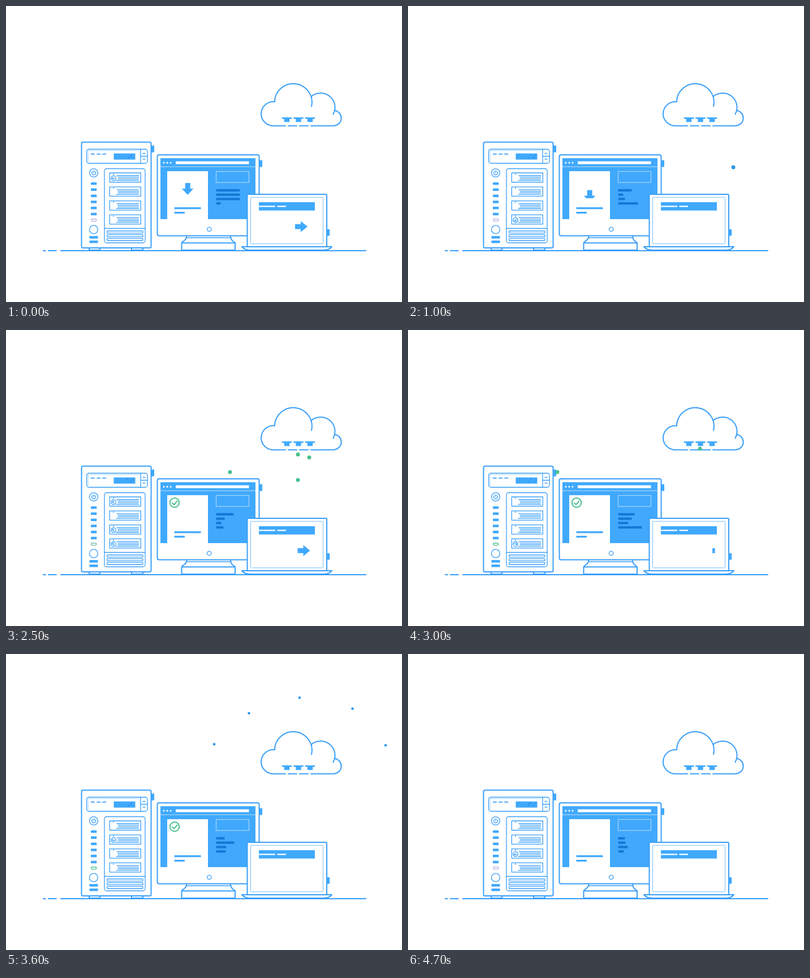
Write an HTML page that moves like this. It is 700 px wide and 525 px high and loops after 4800 ms.

```html
<!DOCTYPE html>
<html lang="en">
<head>
<meta charset="utf-8">
<title>Cloud sync</title>
<style>
html, body { margin: 0; width: 100%; height: 100%; overflow: hidden; background: #fff; }
svg { display: block; width: 700px; height: 525px; }
.line { fill: none; stroke: #389ef9; stroke-width: 2; stroke-linejoin: round; stroke-linecap: round; }
.thin { stroke-width: 1.3; }
.pale { stroke: #a9d5fd; stroke-width: 1.2; }
.body { fill: #fff; }
.fill { fill: #40a9fd; }
.white { fill: #fff; }
.dark { fill: #1279d6; }
</style>
</head>
<body>
<svg viewBox="0 0 700 525">
  <defs>
    <clipPath id="downClip"><rect x="305" y="313" width="32" height="28"/></clipPath>
    <clipPath id="rightClip"><rect x="510" y="378" width="32.6" height="28"/></clipPath>
    <path id="toCloud" d="M570 401H596V286H536V203"/>
    <path id="fromScreen" d="M451 279H516V205"/>
    <path id="toServer" d="M496 205V252H258"/>
  </defs>

  <path class="line" d="M66 434h4M75 434h14M97 434H636"/>

  <g id="cloud">
    <path class="line" d="M470 212.4A21.3 21.3 0 1 1 474.8 170A33 33 0 1 1 540 178M539.5 160.5A25.5 25.5 0 0 1 578.5 192M580.5 185.3A13.5 13.5 0 0 1 580 212.2"/>
    <path class="line" d="M470 212.4H494M499 212.4H514M519 212.4H534M539 212.4H580"/>
  </g>

  <g id="server">
    <path class="line body" d="M147 429h19v4h-19zM222 429h20v4h-20z"/>
    <rect class="line body" x="133.5" y="241.5" width="123" height="187.5" rx="2.5"/>
    <rect class="fill" x="257" y="247.5" width="5" height="12"/>
    <rect class="line thin" x="142.5" y="254" width="107.5" height="25" rx="4"/>
    <path class="line thin" d="M238 254V279M238 266.5H250M242 261.5h4M242 271.5h4"/>
    <path class="pale" fill="none" d="M145 277V256.5H236"/>
    <path class="line" stroke-linecap="butt" d="M150.5 262.7h5.5M161 262.7h5.5M171 262.7h5.5" style="stroke-width:1.7"/>
    <rect class="fill" x="190.5" y="261.5" width="38" height="11"/>
    <g id="lcd" class="dark"></g>
    <circle class="line thin" cx="155" cy="296" r="7.4"/>
    <path class="line thin" d="M152.8 293.6a3.4 3.4 0 1 0 4.4 0M155 292v3.5"/>
    <rect id="lamp" x="150.7" y="378" width="9" height="3.6" rx="1" fill="#fff" stroke-width="1.3"/>
    <circle class="line thin" cx="155" cy="396.5" r="7.4"/>
    <path class="fill" d="M147.5 408h15v4.5h-15zM147.5 416h15v4.5h-15z"/>
    <rect class="line thin" x="174" y="288.5" width="72" height="131.5" rx="4"/>
    <path class="line thin" d="M174 394.5H246"/>
  </g>

  <g id="monitor">
    <path class="line body" d="M319.500 407q0 7-6 10l-3 3v13h94.500v-13l-5-4q-3-3-3-9M311 420.300H404.500"/>
    <path class="line thin" d="M319 411H397"/>
    <rect class="line body" x="267.5" y="264" width="180" height="143.5" rx="3"/>
    <rect class="fill" x="448" y="273.5" width="5" height="12"/>
    <rect class="fill" x="273" y="270" width="168" height="108"/>
    <path class="pale" d="M273 285.200H441"/>
    <g class="white">
      <circle cx="279" cy="278" r="1.600"/><circle cx="285" cy="278" r="1.600"/><circle cx="291" cy="278" r="1.600"/>
      <rect x="300" y="275.500" width="129.500" height="5"/>
      <rect x="285" y="293" width="72" height="85.500"/>
    </g>
    <rect class="pale" fill="none" x="371.500" y="293.500" width="58" height="19.500"/>
    <path class="fill" d="M297.500 357h47v3.300h-47zM297.500 365h18.500v3.300h-18.500z"/>
    <g id="bars" class="dark"></g>
    <g clip-path="url(#downClip)"><path id="down" class="fill" d="M316.700 314h9v10h5.500L321.200 335 311 324h5.700z"/></g>
    <g id="check" fill="none" stroke-width="2" stroke-linecap="round" stroke-linejoin="round">
      <circle r="8.200"/><path d="M-4 .5L-1 3.500 4.300-2.800"/>
    </g>
    <circle class="line thin" cx="359.200" cy="396" r="3.700"/>
  </g>

  <g id="laptop">
    <rect class="line body" x="426.500" y="334" width="140.500" height="93" rx="2"/>
    <rect class="line" style="stroke-width:1;stroke:#79bffb" x="432.500" y="339.300" width="128" height="82.500" rx="1"/>
    <path class="line body" d="M417 427H576q-5 6-14 6H431q-9 0-14-6z"/>
    <rect class="fill" x="567.500" y="396" width="4.700" height="11.500"/>
    <rect class="fill" x="447" y="348" width="99" height="14.700"/>
    <path class="white" d="M447 354.300h29v2.200h-29zM479.500 354.300h15.500v2.200h-15.500z"/>
    <g clip-path="url(#rightClip)"><path id="right" class="fill" d="M511 387h10v-5.500L533 391.300 521 401v-5.200h-10z"/></g>
  </g>

  <g id="dots"></g>
  <g id="sparks"></g>
</svg>
<script>
const $ = id => document.getElementById(id);
const add = (parent, tag, attrs) => {
  const el = document.createElementNS('http://www.w3.org/2000/svg', tag);
  for (const k in attrs) el.setAttribute(k, attrs[k]);
  return parent.appendChild(el);
};
const show = (el, on) => el.style.display = on ? '' : 'none';
const ramp = (t, a, b) => Math.min(1, Math.max(0, (t - a) / (b - a)));
const mix = (a, b, k) => `rgb(${a.map((v, i) => Math.round(v + (b[i] - v) * k))})`;
const BLUE = [46, 151, 226], GREEN = [72, 193, 140], LILAC = [190, 176, 216];

// Fixed repeated parts
for (const x of [496.5, 517, 537.5])
  add($('cloud'), 'path', { class: 'fill', d: `M${x - 8.7} 197.600h17.400v2.600h-4v5.600h-9.400v-5.600h-4z` });
for (let i = 0; i < 6; i++)
  add($('server'), 'rect', { class: 'fill', x: 150, y: 312.8 + i * 10.8, width: 10.3, height: 4.5, rx: .8 });
for (let i = 0; i < 3; i++)
  add($('server'), 'rect', { class: 'line thin', x: 178.5, y: 399 + i * 6.6, width: 63.5, height: 3.8, rx: 1 });

const spinners = [0, 1, 2, 3].map(i => {
  const y = 296 + i * 24.8;
  add($('server'), 'rect', { class: 'line thin', x: 183.3, y, width: 55, height: 16.5 });
  add($('server'), 'circle', { class: 'fill', cx: 190, cy: y + 2.3, r: 1.1 });
  add($('server'), 'path', {
    class: 'line', style: 'stroke-width:1.3',
    d: `M196 ${y + 5}H234.500M198 ${y + 7.8}H234.500M198 ${y + 10.6}H234.500M195 ${y + 13.4}H234.500`
  });
  const g = add($('server'), 'g', {});
  add(g, 'circle', { class: 'line thin body', r: 4.3 });
  add(g, 'path', { class: 'line thin', d: 'M-2-1.500L2 1.500M-1 2A2.300 2.300 0 0 1-2 0' });
  return { g, y: y + 9.4 };
});
const bays = '1 3 2 4 1 2 3 4 134 2 4 1 2 4 1 3'.split(' ');

const leds = Array.from({ length: 8 }, (_, i) =>
  add($('lcd'), 'rect', { x: 213 + i % 4 * 3.5, y: i < 4 ? 264.5 : 268, width: 1.5, height: 1.5 }));

// Width of the four text bars at each key time
const barTimes = [0, 1000, 1600, 2500, 3000, 3600, 4700];
const barWidths = [
  [42, 24, 25, 31, 29, 15, 12],
  [42, 9, 39, 15, 24, 32, 13],
  [42, 12, 21, 9, 18, 18, 17],
  [8, 35, 8, 13, 42, 17, 10]
];
const bars = barWidths.map((_, i) =>
  add($('bars'), 'rect', { x: 371.5, y: 324.7 + i * 7.8, height: 4.2, rx: .8 }));

// Packets: route, start time, speed in px per ms
const dots = [
  ['toCloud', 178, .197], ['toCloud', 1119, .189],
  ['fromScreen', 1230, .097], ['fromScreen', 1797, .111],
  ['toServer', 1305, .264], ['toServer', 1943, .264]
].map(([id, start, speed]) => ({
  path: $(id), len: $(id).getTotalLength(), start, speed,
  el: add($('dots'), 'circle', { r: 3.5 })
}));

const sparks = [[368, 160], [429.5, 105], [519, 77.5], [612.5, 97], [671, 162]].map(([cx, cy]) =>
  add($('sparks'), 'circle', { cx, cy, fill: '#2b97f3' }));

// Slides out at constant speed, then comes back in from behind its clip edge
function arrowShift(t, period, back, size) {
  const p = t % period;
  return p < back ? p * .045 : -size * (1 - ramp(p, back, period));
}

function draw(t) {
  const down = $('down'), right = $('right'), check = $('check');
  show(down, t < 1400);
  down.setAttribute('transform', `translate(0 ${arrowShift(t, 720, 620, 23)})`);
  show(right, t < 3200);
  right.setAttribute('transform', `translate(${arrowShift(t, 1200, 1000, 24)} 0)`);

  const size = (.3 + .7 * ramp(t, 1500, 1900)) * (1 - ramp(t, 4100, 4400));
  show(check, t >= 1500 && size > 0);
  check.setAttribute('transform', `translate(298 306.300) scale(${size})`);
  check.setAttribute('stroke', mix(BLUE, GREEN, ramp(t, 1400, 1800)));

  $('lamp').setAttribute('stroke', mix(LILAC, GREEN, ramp(t, 1400, 3000) * (1 - ramp(t, 4000, 4600))));

  const slot = Math.floor(t / 300);
  spinners.forEach(({ g, y }, i) => {
    show(g, bays[slot].includes(i + 1));
    g.setAttribute('transform', `translate(190 ${y}) rotate(${t * .3})`);
  });
  leds.forEach((el, i) => show(el, Math.sin(slot * 7.3 + i * 4.1) > .1));

  let k = 0;
  while (k < barTimes.length - 2 && t >= barTimes[k + 1]) k++;
  const f = ramp(t, barTimes[k], barTimes[k + 1]);
  bars.forEach((el, i) => {
    const w = barWidths[i];
    el.setAttribute('width', w[k] + (w[k + 1] - w[k]) * f);
  });

  for (const d of dots) {
    const s = (t - d.start) * d.speed;
    show(d.el, s >= 0 && s <= d.len);
    const p = d.path.getPointAtLength(s);
    d.el.setAttribute('cx', p.x);
    d.el.setAttribute('cy', p.y);
    d.el.setAttribute('fill', mix(BLUE, GREEN, ramp(t, 1000, 1500)));
  }

  const r = 2.3 * ramp(t, 3200, 3500) * (1 - ramp(t, 4200, 4600));
  for (const el of sparks) el.setAttribute('r', r);
}

const began = performance.now();
function tick() {
  draw(Math.floor((performance.now() - began) / 100) % 48 * 100);
  requestAnimationFrame(tick);
}
tick();
</script>
</body>
</html>
```
